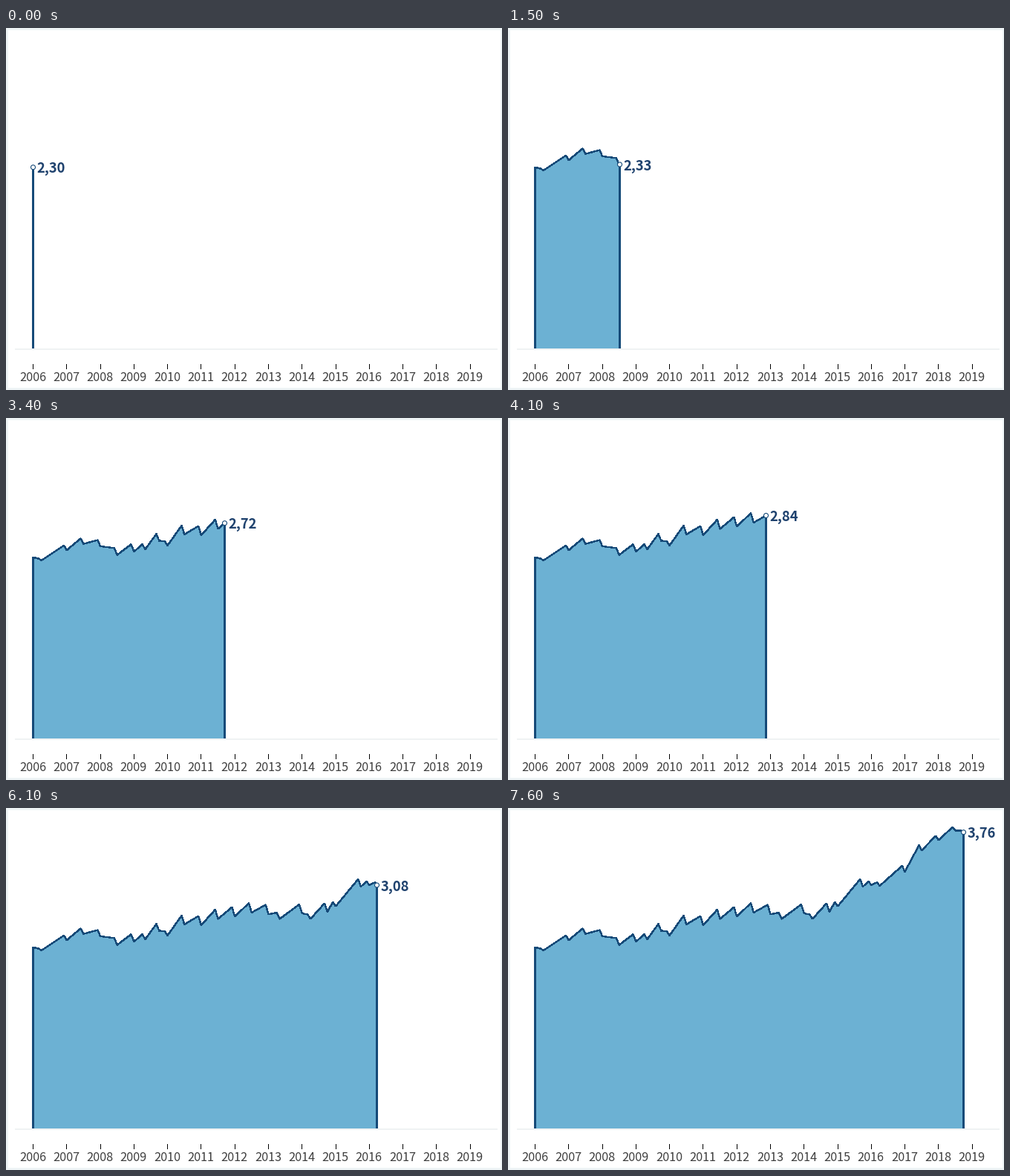
These frames come from a looping animation (668 by 488 pixels, 7.7 s). A matplotlib script:

```python
import matplotlib.pyplot as plt
import numpy as np
from matplotlib.animation import FuncAnimation
from matplotlib.patches import Circle, Rectangle

W, H, DPI = 668, 488, 100
FRAMES, INTERVAL = 77, 100
X0, BASE = 36.5, 432
YEAR_W = 45.28
SCALE = 1.062  # pixels per hundredth
LAST = 153     # last month of the series

FILL, NAVY, LABEL = "#6cb1d3", "#164a78", "#1f426e"
PALE, GREY = "#eef4f6", "#3e3e3e"

# Low points of the series: month, value in hundredths.
TROUGHS = [
    (0, 230), (3, 226), (12, 239), (18, 247), (24, 244), (30, 233),
    (36, 237), (40, 240), (45, 251), (48, 245), (54, 259), (60, 258),
    (66, 266), (72, 269), (78, 274), (84, 272), (88, 266), (96, 273),
    (99, 266), (105, 275), (108, 282), (117, 307), (120, 309), (123, 308),
    (132, 326), (138, 353), (144, 366), (150, 378), (153, 376),
]


def sawtooth(troughs):
    """Climb to a peak one month before each trough, then drop into it."""
    points = [troughs[0]]
    for (a, _), (b, low) in zip(troughs, troughs[1:]):
        swing = 4 + 8 * np.sin(np.pi * b / LAST)
        points += [(b - 1, low + swing * min(1, (b - a) / 6)), (b, low)]
    return np.array(points, dtype=float).T


months, values = sawtooth(TROUGHS)


def px(size):
    """Pixels to points."""
    return size * 72 / DPI


def value_at(month):
    return np.interp(month, months, values)


def x_at(month):
    return X0 + month * YEAR_W / 12


def y_at(value):
    return BASE - value * SCALE


plt.rcParams["font.family"] = "Noto Sans CJK JP"
fig = plt.figure(figsize=(W / DPI, H / DPI), dpi=DPI, facecolor="white")
ax = fig.add_axes([0, 0, 1, 1])
ax.set_xlim(0, W)
ax.set_ylim(H, 0)
ax.axis("off")


def box(x, y, w, h, color):
    ax.add_patch(Rectangle((x, y), w, h, facecolor=color, linewidth=0,
                           antialiased=False))


box(0, 0, W, 3, PALE)
box(0, H - 3, W, 3, PALE)
box(0, 0, 3, H, PALE)
box(W - 2, 0, 2, H, PALE)
box(12, BASE, 650, 2, "#eff2f3")

for i in range(14):
    x = x_at(12 * i)
    box(np.floor(x), 453, 1, 7, "black")
    ax.text(x - 0.5, 476, str(2006 + i), fontsize=px(16.3), color=GREY,
            ha="center", va="baseline")

area, = ax.fill([X0], [BASE], facecolor=FILL, linewidth=0)
outline, = ax.plot([], [], color=NAVY, linewidth=px(1.3), snap=False,
                   antialiased=False, solid_capstyle="butt",
                   solid_joinstyle="miter")
dot = ax.add_patch(Circle((X0, BASE), 3, facecolor="white", edgecolor=NAVY,
                          linewidth=px(1.1), zorder=4))
label = ax.text(0, 0, "", fontsize=px(18.4), fontweight="bold", color=LABEL,
                ha="left", va="baseline", zorder=5)


def update(frame):
    now = frame * LAST / (FRAMES - 1)
    m = np.append(months[months < now], now)
    xs, ys = x_at(m), y_at(value_at(m))
    xs[-1] = np.floor(xs[-1]) + 0.5
    x, y = xs[-1], ys[-1]

    path = np.column_stack([np.r_[X0, xs, x], np.r_[BASE, ys, BASE]])
    area.set_xy(path)
    outline.set_data(path[:, 0], path[:, 1])
    dot.center = (x, y)
    label.set_position((x + 5, y + 7.5))
    label.set_text(f"{value_at(round(now)) / 100:.2f}".replace(".", ","))
    return area, outline, dot, label


anim = FuncAnimation(fig, update, frames=FRAMES, interval=INTERVAL,
                     repeat=True, repeat_delay=0, blit=False)
plt.show()
```
